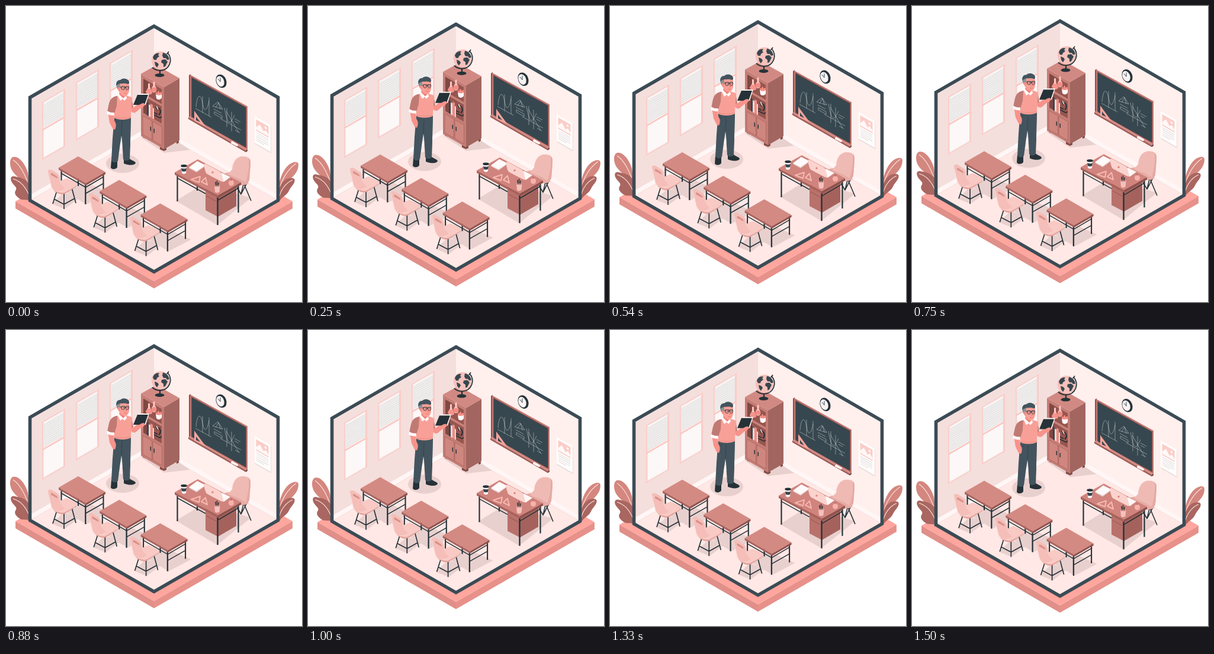
Write an HTML page with a canvas that moves like this. It is 500 by 500 pixels and loops after 1540 ms.

```html
<!DOCTYPE html>
<html lang="en">
<head>
<meta charset="utf-8">
<title>Classroom</title>
<style>
html, body { margin: 0; width: 100%; height: 100%; overflow: hidden; background: #fff; }
canvas { display: block; width: 100vw; height: 100vh; }
</style>
</head>
<body>
<canvas id="stage"></canvas>
<script>
const canvas = document.getElementById('stage');
const ctx = canvas.getContext('2d');
const ISO = 0.577;
const LOOP = 1540, PEAK = 710, RISE = 10;
const DARK = '#37474f', INK = '#263238', WHITE = '#fffafa', SKIN = '#f7938b',
  WOOD = '#d38a83', WOOD_DARK = '#9c5b56', SHADE = '#e8d0ce';

const fill = (color, d) => { ctx.fillStyle = color; ctx.fill(new Path2D(d)); };
const line = (color, width, d) => {
  ctx.strokeStyle = color;
  ctx.lineWidth = width;
  ctx.stroke(new Path2D(d));
};
const oval = (color, x, y, rx, ry = rx, turn = 0) => {
  ctx.fillStyle = color;
  ctx.beginPath();
  ctx.ellipse(x, y, rx, ry, turn, 0, 7);
  ctx.fill();
};
const rect = (color, x, y, w, h) => { ctx.fillStyle = color; ctx.fillRect(x, y, w, h); };
// Draws in a plane sheared vertically by the given slope.
const plane = (x, y, slope, draw) => {
  ctx.save();
  ctx.transform(1, slope, 0, 1, x, y);
  draw();
  ctx.restore();
};
const at = (x, y, draw) => plane(x, y, 0, draw);

function base() {
  fill('#ffa69e', 'M16 330 250 195 484 330 250 465Z');
  fill('#e08f89', 'M16 330 250 465V477L16 342Z');
  fill('#e7918a', 'M484 330 250 465V477L484 342Z');
}

function plants() {
  const leaf = '#d4877f', deep = '#aa6660', vein = '#fde4e1';
  fill(leaf, 'M42 318C34 296 20 292 11 279C5 269 6 257 12 255C22 253 33 267 37 282Z');
  line(vein, 1.1, 'M12 260C24 268 33 285 40 308');
  fill(deep, 'M42 328L26 327C18 323 13 317 16 312C20 307 15 305 10 298C6 291 9 286 15 288C24 290 34 290 42 305Z');
  line(vein, 1.1, 'M12 292C25 296 33 305 40 322');
  fill(leaf, 'M458 318C461 296 466 278 478 268C486 262 494 262 494 268C494 281 484 289 476 296C466 304 464 312 462 322Z');
  line(vein, 1.1, 'M490 266C476 276 466 292 461 312');
  fill(deep, 'M458 328C459 307 467 293 478 291C487 289 490 293 486 300C483 305 480 307 478 312C474 320 468 321 463 328Z');
  line(vein, 1.1, 'M484 294C472 299 464 311 461 324');
}

function blindWindow(x, y) {
  plane(x, y, -ISO, () => {
    rect('#fbcac5', 0, 0, 39, 98);
    rect('#f6e4e2', 1.5, 1.5, 36, 95);
    rect('#fdf8f8', 3, 3, 33.5, 92);
    rect('#f1eeee', 3, 5, 33.5, 40);
    for (let i = 0; i < 11; i++) rect('#dcdada', 3, 7 + i * 3.6, 33.5, 0.8);
    rect('#fbc8c2', 1, 46, 37, 3.2);
    rect('#fbcac5', 36, 2, 1.4, 94);
  });
}

function room() {
  fill('#ffe8e5', 'M41 328 250 208 459 328 250 449Z');
  fill('#f4dfdd', 'M41 155 250 34V208L41 328Z');
  fill('#ffefed', 'M459 155 250 34V208L459 328Z');
  fill('#fff6f5', 'M41 319 250 199 459 319V328L250 208 41 328Z');
  line('#efd8d5', 0.6, 'M41 328 250 208 459 328');
  [0, 1, 2].forEach(i => blindWindow(61 + i * 57, 162 - i * 32.8));
}

function frame() {
  ctx.lineJoin = 'miter';
  line('#3b4b55', 5.6, 'M250 34 40.5 154.5V328.5L250 449 459.5 328.5V154.5Z');
  ctx.lineJoin = 'round';
}

function blackboard() {
  fill('#8f514c', 'M309 117 312 115V189L309 188Z');
  plane(311, 116, 0.552, () => {
    rect('#c07871', 0, 0, 97, 73);
    rect('#8f514c', 2, 2.5, 93, 69);
    rect(DARK, 2.8, 3.6, 91.4, 67);
    const chalk = 'rgba(255,255,255,.5)';
    line(chalk, 0.7, 'M9 52H36M21 25V53M32 21V52M10 49C12 24 18 23 21 36C23 49 28 50 32 26');
    line(chalk, 0.7, 'M38 32 47 20 55 28ZM43 32 48 21 51 30M41 40H54V44H41ZM40 36H53');
    line(chalk, 0.7, 'M51 46H86M62 22V54M70 24V57M58 24C63 50 67 50 75 27M61 28 82 52M75 33H85M75 37H82M76 52H84');
  });
  fill(WOOD, 'M308 188 311 186 408 242 405 244Z');
  fill(WOOD_DARK, 'M308 188 405 244V247L308 191Z');
  fill('#7d4541', 'M405 244 408 242V245L405 247Z');
  fill('#fff4f2', 'M380 230 382 228 392 234V236L390 237 380 232Z');
  fill('#f6a49c', 'M318 177V194L337 203Z');
  fill(DARK, 'M321 187V193L328 196Z');
}

function wallItems() {
  oval(INK, 363.5, 127, 8.6, 11.7, -0.38);
  oval('#fbf4f4', 362, 127.3, 6.3, 9.2, -0.38);
  line(DARK, 1, 'M358 123 362 128V121');
  line('#d9c6c4', 0.6, 'M357 130 358 129M366 129 367 130M363 135V134');
  plane(420, 186, ISO, () => {
    rect('#e6dcdb', 0.8, 0.8, 27, 46);
    rect('#fffdfc', 0, 0, 27, 45);
    rect('#fbcdc8', 2.5, 4, 21, 19);
    fill('#fff8f7', 'M2.5 21V17L9 9 15 17 19 13 23.5 18V21Z');
    oval('#fff', 18.5, 9, 1.8);
    for (let i = 0; i < 5; i++) rect('#dad5d5', 3, 26 + i * 3.2, i === 4 ? 13 : 20, 0.9);
  });
}

function bookcase() {
  fill(SHADE, 'M228 222 267 248 311 243 293 231Z');
  fill('#844a45', 'M231 219H236V224L231 222ZM260 237H267V245L260 242ZM267 241 271 239V243L267 245ZM288 228H292V231L288 233Z');
  fill('#d18a83', 'M228 114.5 254 100 293 122 267 137Z');
  fill('#c57d76', 'M228 114.5 267 137V242L228 219.5Z');
  fill('#a2655f', 'M293 122 267 137V242L293 227Z');
  line('#d9968f', 0.7, 'M228 114.5 267 137 293 122');
  plane(228, 114.5, ISO, () => {
    rect('#7f4843', 4, 6, 31, 59);
    rect('#96564f', 12, 6, 23, 59);
    rect('#c9827b', 4, 32, 31, 3);
    rect('#d9958e', 4, 31, 31, 1);
    rect('#d9958e', 4, 64, 31, 1);
    rect('#ce867f', 3, 69, 15.5, 32);
    rect('#ce867f', 20, 69, 15.5, 32);
    line('#a9635d', 0.7, 'M3 69H18.5V101H3ZM20 69H35.5V101H20Z');
    rect(INK, 15.5, 80, 1.5, 7);
    rect(INK, 21.5, 80, 1.5, 7);
    rect(DARK, 10, 42, 3, 22);
    rect('#fbd4d0', 13, 44, 3, 20);
    rect('#e98e86', 16, 41, 4, 23);
    rect('#fbd4d0', 20, 46, 2, 18);
  });
  fill('#ffc9c4', 'M240 131H243V137L247 147C244 151 238 149 236 145L240 138Z');
  fill('#f7938b', 'M239 140H244L247 147C244 151 238 149 236 145Z');
  fill('#ffc9c4', 'M248.5 128H251.5V135C256 139 255 146 250 146C245 146 244 139 248.5 135Z');
  oval('#f38c83', 250, 141, 4.2, 4);
  fill('#f58f86', 'M254 150C252 146 253 144 256 147C256 142 259 142 259 147C263 143 264 147 262 151Z');
  fill(WHITE, 'M253 149C256 151 261 151 263 149V155C261 159 256 159 254 156Z');
  line(INK, 2, 'M253 169 256 176M257 172C262 175 262 181 258 184');
  line('#f6c4bf', 1.8, 'M254 169 257 175');
  line(INK, 1.6, 'M250 180 256 183M250 184 260 189 263 187');
}

function globe() {
  oval(INK, 259.5, 117, 8, 3);
  line(INK, 2.3, 'M260 117V109');
  line(INK, 1.8, 'M273 79C283 91 276 108 261 109C254 109 250 107 247 104M271 82 275 77');
  oval('#f6c1bb', 261, 92, 15.3);
  ctx.save();
  ctx.beginPath();
  ctx.arc(261, 92, 15.3, 0, 7);
  ctx.clip();
  fill(DARK, 'M248 87C250 81 254 79 259 80L257 83 259 85 255 88 254 91 250 91Z');
  fill(DARK, 'M251 94 256 96 258 99 255 104 252 100Z');
  fill(DARK, 'M265 79C270 79 275 84 276 90L272 91 270 88 266 88 264 84Z');
  fill(DARK, 'M263 91 269 90 273 94 269 102 266 103 266 98 262 95Z');
  ctx.restore();
}

function teacher() {
  oval(SHADE, 197, 266, 28, 16);
  // Shoes and trousers
  fill(INK, 'M178 260H188V272C187 276 179 277 177 273Z');
  fill(INK, 'M199 258H209C212 261 218 262 219 265C218 269 209 270 199 266Z');
  fill('#43545e', 'M183 187C189 192 204 193 211 188C211 208 210 220 210 235L209 259C206 262 201 262 198 259L196 226 195 219 193 232 189 262C186 265 180 265 178 261L180 224Z');
  line('#2e3d46', 0.7, 'M196 194C196 204 195 210 195 219M185 197 190 194');
  // Far arm and book
  fill('#c07a74', 'M207 153C213 155 214 163 215 174L209 177Z');
  fill(SKIN, 'M209 173C212 181 217 182 221 178L236 165C239 160 238 156 236 153L229 160 216 171Z');
  fill('#fff3f1', 'M223 148 242 148 236 167 216 167Z');
  fill(INK, 'M222 150 240 150 234 167 215 167Z');
  fill(SKIN, 'M224 171C223 167 229 164 233 164L235 167 229 173Z');
  // Body
  fill('#f8a097', 'M184 153C191 150 207 150 213 155C213 166 211 180 211 189C204 193 189 193 183 189L182 172Z');
  line('#e5877e', 0.8, 'M183 187C190 190 204 190 211 187');
  fill('#c07a74', 'M188 152C179 153 175 158 173 169L171 179 183 182 187 169Z');
  fill(SKIN, 'M172 179 182 181 183 194C187 198 186 205 184 209L180 207 175 197Z');
  fill(WHITE, 'M171 177C175 180 179 180 183 180L182 185C177 185 173 184 170 182Z');
  fill('#ef847b', 'M191 147H204V154L199 159 192 153Z');
  fill(WHITE, 'M191 149 198 156 203 151 204 156 200 160 197 157 193 160 189 152Z');
  // Head
  fill('#fa9f96', 'M190 132C194 126 207 127 208 132V143C207 150 203 153 199 152C193 150 190 145 189 139Z');
  fill('#43545e', 'M188 138C184 131 187 125 193 125C197 121 204 122 207 126C209 129 208 132 206 132C202 130 197 131 193 131Z');
  fill('#87949a', 'M188 133 193 131 193 136 192 143C188 142 186 137 188 133Z');
  oval('#f58f86', 190.5, 140, 1.9, 2.6);
  line(INK, 1, 'M193 137 195 137.5M195 136H200.5V140C199 142 196 142 195 140ZM202.5 136H207.5V140C206 142 204 142 202.5 140ZM200.5 137.5H202.5');
  oval(INK, 198.5, 138.5, 0.8);
  oval(INK, 205, 138.5, 0.8);
  line('#d96d65', 0.8, 'M202 139 203.5 143.5 201.5 144M199 147C201 148 203 148 204 147');
}

function teacherDesk() {
  fill(SHADE, 'M287 329 333 301 414 324 357 370Z');
  // Chair
  line(INK, 1.6, 'M397 289 414 329M405 285 397 318 390 306M397 318 409 295');
  fill('#e6aba5', 'M366 284C377 279 388 280 399 290L410 299C401 306 386 302 378 295Z');
  fill('#f0bab4', 'M382 276C383 262 390 254 400 254C410 254 414 258 413 267L411 294C409 301 402 297 395 292L375 284Z');
  fill('#e4aaa4', 'M410 257C414 260 413 266 413 269L411 294C410 298 407 298 405 297C409 284 411 271 410 257Z');
  // Legs and drawers
  line(INK, 2.2, 'M289.5 286V330M392.5 300V349M323 270V312');
  fill('#b9716b', 'M337 306 358 318V356L337 345Z');
  fill('#a5625c', 'M358 320 389 303V338L358 356Z');
  line('#844a45', 0.7, 'M339 321 355 330');
  line(INK, 2.4, 'M357.5 321V370');
  line(INK, 1.5, 'M290 291 337 317M358 328 392 308');
  fill('#d0847d', 'M285 281 324 259 397 298 358 320Z');
  fill('#a8625c', 'M285 281 358 320V324L285 285Z');
  fill('#8f514c', 'M397 298 358 320V324L397 302Z');
  // Coffee cup
  fill(WHITE, 'M296 270H305L304 282C302 284 299 284 297 282Z');
  fill(DARK, 'M296 274C299 275 303 275 305 274L304 279C302 280 299 280 297 279Z');
  oval(INK, 300.5, 270, 5.2, 2.3);
  // Paper and laptop
  fill('#e5cfcc', 'M309 274 323 264 337 270 322 281Z');
  fill('#fffafa', 'M309 272.5 323 262 337 269 322 279Z');
  fill('#fff8f7', 'M361 294 346 287 365 282 379 289 368 297Z');
  fill('#fbd3ce', 'M334 269C334 267 336 266 338 267L360 279C362 280 363 281 364 283L367 295C367 297 365 297 363 296L342 285C339 284 338 282 337 280Z');
  oval('#df827a', 349, 281, 1.7);
  // Set squares
  line('#f8b8b1', 2, 'M313 293 328 288 326 298ZM330 297 337 290 340 302Z');
  // Pencil pot
  line(INK, 1.3, 'M355 307 354 297M358 307 359 298M356.5 306V295');
  fill('#f5c1bc', 'M352 304H361.5L360.5 314C358 316 355 316 353 314Z');
  oval('#d9958e', 356.7, 304, 4.8, 1.6);
  line(INK, 1.1, 'M355 304 354 298M358 304 359 299');
  // Apple
  oval('#f7b1aa', 380.5, 299, 4.6, 4.8);
  line(WOOD_DARK, 1, 'M380 295 381 292');
}

function pupilDesk() {
  fill(SHADE, 'M94 310 125 293 174 315 136 335Z');
  line(INK, 2.1, 'M93.5 276V299M164.5 282V314M122 287V304');
  line(INK, 1.5, 'M134 317 164 300M94 283 134 306M135 306 164 289');
  line(INK, 2.3, 'M134.3 300V335');
  fill(WOOD, 'M89 273 122 254 168 280.5 135 299.5Z');
  fill('#a8625c', 'M89 273 135 299.5V303L89 276.5Z');
  fill('#8f514c', 'M168 280.5 135 299.5V303L168 284Z');
}

function pupilChair() {
  fill(SHADE, 'M77 334 98 315 124 324 99 343Z');
  line(INK, 1.7, 'M86 312 79 334M98 316V343M111 307 118 333M81 326 98 335 116 325');
  line(INK, 1.2, 'M91 312 98 316 110 309');
  fill('#e4a29b', 'M78 308C84 317 94 320 100 317L119 305V302L90 302Z');
  fill('#f9c9c4', 'M79 306C84 314 93 317 99 315L117 305C121 302 120 298 116 297L102 291C94 294 85 298 79 306Z');
  fill('#f5beb8', 'M71 281C70 277 74 275 79 278L87 283C91 286 92 291 91 296C91 301 95 304 99 308C94 316 81 314 77 306Z');
  line('#fbd7d3', 0.9, 'M71 281 77 306C81 314 90 315 97 311');
  fill('#d9918a', 'M76 284C75 282 77 282 79 283L85 287C87 288 88 291 86 291L79 287C77 286 76 286 76 284Z');
}

function scene() {
  base();
  plants();
  room();
  blackboard();
  wallItems();
  frame();
  bookcase();
  globe();
  teacher();
  teacherDesk();
  for (let i = 0; i < 3; i++) {
    at(i * 69.3, i * 39.8, () => { pupilDesk(); pupilChair(); });
  }
}

// Linear rise and fall of the whole room.
const lift = t => {
  const phase = (((t - PEAK) % LOOP) + LOOP) % LOOP / LOOP;
  return RISE * Math.abs(1 - 2 * phase);
};

function draw(now) {
  const ratio = window.devicePixelRatio || 1;
  const w = Math.round(innerWidth * ratio), h = Math.round(innerHeight * ratio);
  if (canvas.width !== w || canvas.height !== h) {
    canvas.width = w;
    canvas.height = h;
  }
  ctx.setTransform(w / 500, 0, 0, h / 500, 0, 0);
  ctx.lineJoin = 'round';
  rect('#fff', 0, 0, 500, 500);
  at(0, lift(0) - lift(now), scene);
  requestAnimationFrame(draw);
}
draw(0);
</script>
</body>
</html>
```
